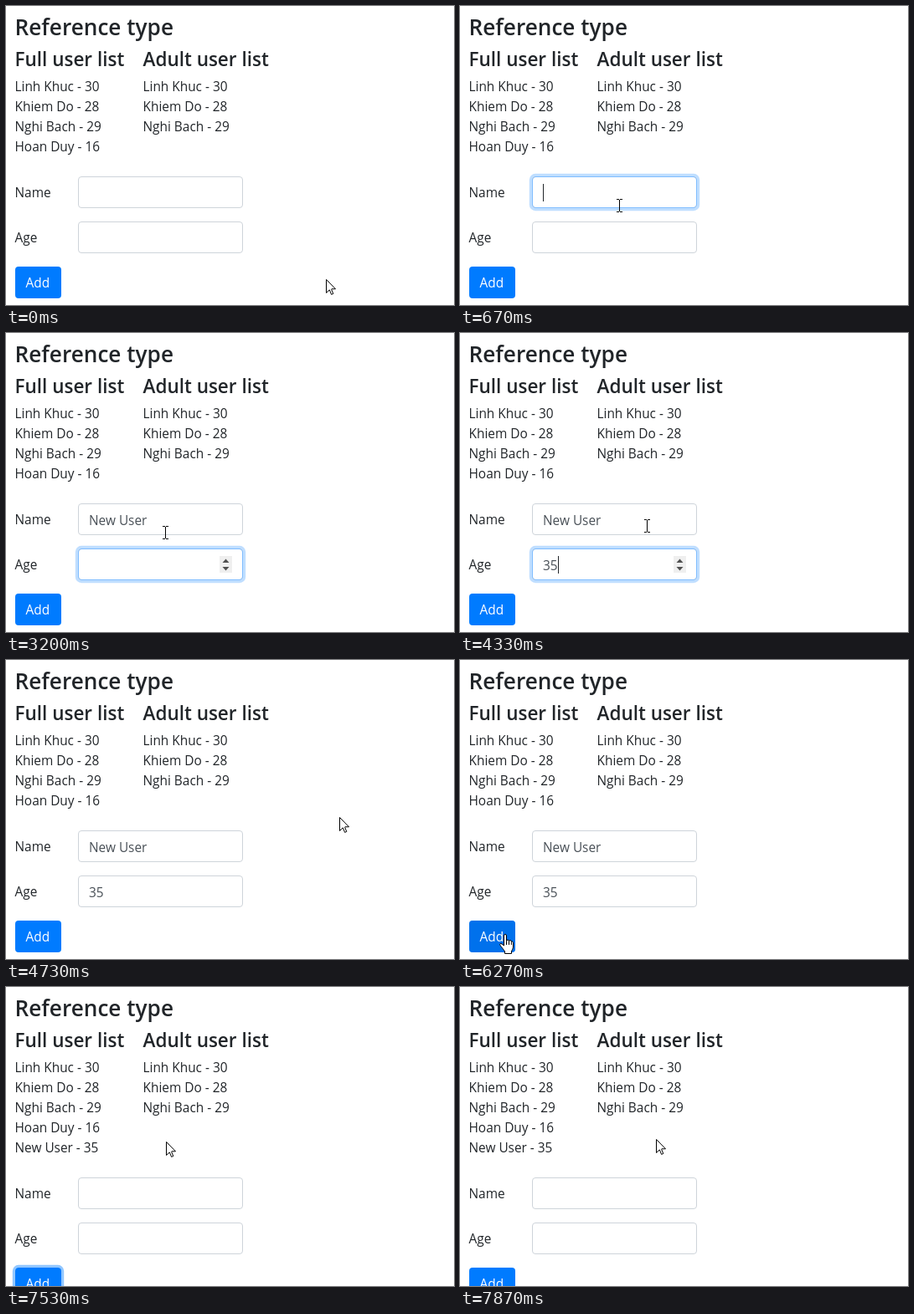
These frames come from a looping animation (535x358 px, 8000 ms). An HTML page:

```html
<!DOCTYPE html>
<html lang="en">
<head>
<meta charset="utf-8">
<title>Reference type</title>
<style>
html, body { margin: 0; width: 100%; height: 100%; overflow: hidden; background: #fff; }
svg { display: block; width: 100%; height: 100%; }
text { font: 15.4px "Open Sans", "Noto Sans", sans-serif; fill: #212529; white-space: pre; }
.h3 { font-size: 26.2px; font-weight: 600; }
.h4 { font-size: 22.5px; font-weight: 600; }
.value { fill: #495057; }
</style>
</head>
<body>
<svg id="stage" viewBox="0 0 535 358"></svg>
<script>
const NS = 'http://www.w3.org/2000/svg';
const LOOP = 8000, RATE = 15 / 1000;
const LEFT = 10.5, RIGHT = 163.5;
const stage = document.getElementById('stage');

function add(parent, tag, attrs, content) {
  const el = document.createElementNS(NS, tag);
  for (const key in attrs) el.setAttribute(key, attrs[key]);
  if (content) el.textContent = content;
  return parent.appendChild(el);
}
const label = (parent, x, y, content, cls = '') => add(parent, 'text', { x, y, class: cls }, content);
const show = (el, on) => el.setAttribute('visibility', on ? 'visible' : 'hidden');
const fade = (el, value) => el.setAttribute('opacity', value);

// Value of a keyframe list [[tick, ...values]] at a tick
function track(keys, tick, ease = u => u) {
  let i = 0;
  while (i < keys.length - 1 && keys[i + 1][0] <= tick) i++;
  const a = keys[i], b = keys[i + 1];
  if (tick <= a[0] || !b) return a.slice(1);
  const u = ease((tick - a[0]) / (b[0] - a[0]));
  return a.slice(1).map((v, j) => v + (b[j + 1] - v) * u);
}
const smooth = u => u * u * (3 - 2 * u);

// Latest entry of [[tick, value]] that has started
const latest = (list, tick) => list.reduce((v, [at, next]) => tick >= at ? next : v, '');
const within = (spans, tick) => spans.some(([a, b]) => tick >= a && tick < b);

const users = ['Linh Khuc - 30', 'Khiem Do - 28', 'Nghi Bach - 29', 'Hoan Duy - 16'];
label(stage, LEFT, 35, 'Reference type', 'h3');
label(stage, LEFT, 72, 'Full user list', 'h4');
label(stage, RIGHT, 72, 'Adult user list', 'h4');
users.forEach((user, i) => {
  label(stage, LEFT, 102 + 24 * i, user);
  if (i < 3) label(stage, RIGHT, 102 + 24 * i, user);
});
const newUser = label(stage, LEFT, 198, 'New User - 35');

const form = add(stage, 'g');

function ring(x, y, w, h, color) {
  return add(form, 'rect', {
    x: x - 1.6, y: y - 1.6, width: w + 3.2, height: h + 3.2, rx: 5.6,
    fill: 'none', stroke: color, 'stroke-width': 3.2
  });
}
function field(name, y) {
  label(form, LEFT, y + 25, name);
  const border = stroke => add(form, 'rect', {
    x: 86.5, y: y + .5, width: 196, height: 37, rx: 3.5, fill: 'none', stroke
  });
  border('#ced4da');
  return {
    glow: [ring(86, y, 197, 38, 'rgba(0,123,255,.25)'), border('#80bdff')],
    value: label(form, 99, y + 26, '', 'value'),
    caret: add(form, 'rect', { y: y + 9, width: 1, height: 21, fill: '#212529' })
  };
}
const nameField = field('Name', 204);
const ageField = field('Age', 258);

const spinner = add(form, 'g');
add(spinner, 'rect', { x: 255, y: 267, width: 15, height: 20, fill: '#efefef' });
add(spinner, 'path', { d: 'M258.5 275h8l-4-4.5zM258.5 280h8l-4 4.5z', fill: '#505050' });

const buttonRing = ring(11, 312, 55, 38, 'rgba(38,143,255,.5)');
const buttonFace = fill => add(form, 'rect', { x: 11, y: 312, width: 55, height: 38, rx: 4, fill });
buttonFace('#007bff');
const hoverFace = buttonFace('#0069d9');
const activeFace = buttonFace('#0062cc');
label(form, 23.5, 337, 'Add').style.fill = '#fff';

const outline = { fill: '#fff', stroke: '#000', 'stroke-linejoin': 'round' };
const pointer = add(stage, 'g');
const shapes = {
  arrow: add(pointer, 'path', {
    ...outline,
    d: 'M.5.5V16.5L4.3 12.9 6.6 18.4 8.8 17.5 6.7 12.5 6.9 11.8H11.5Z'
  }),
  beam: add(pointer, 'path', {
    fill: '#000',
    d: 'M-3-8h3v1h-3zM1-8h3v1h-3zM0-7h1v14h-1zM-3 7h3v1h-3zM1 7h3v1h-3z'
  }),
  hand: add(pointer, 'path', {
    ...outline,
    d: 'M-1.5 13V1a1.5 1.5 0 0 1 3 0V7.5a1.4 1.4 0 0 1 3 .3 1.4 1.4 0 0 1 2.8.5' +
       ' 1.4 1.4 0 0 1 2.2 1V14c0 3-1.5 4-2 6v2.5H-.5V20C-1.5 18-4.5 15-6 12.5' +
       'c-1-1.5.5-2.8 2-1.5ZM1.5 7.5v4.5M4.5 8v4M7.3 8.5v3.5'
  })
};

const ADDED = 101;
const path = [
  [0, 382, 327], [7, 195, 239], [9, 195, 239], [10, 190, 239],
  [64, 190, 239], [68, 398, 188], [88, 398, 188], [94, 54, 329],
  [101, 54, 329], [106, 68, 195], [109, 68, 195], [115, 234, 182]
];
const nameText = [[21, 'N'], [23, 'New'], [25, 'New '], [32, 'New U'], [34, 'New Use'], [35, 'New User'], [ADDED, '']];
const ageText = [[61, '3'], [65, '35'], [ADDED, '']];
const nameGlow = [[5, 0], [8, 1], [39, 1], [42, 0]];
const ageGlow = [[39, 0], [42, 1], [69, 1], [71, 0]];
const buttonGlow = [[99, 0], [102, 1], [115, 1], [118, 0]];
const hover = [[93, 0], [95, 1], [100, 1], [103, 0]];
const nameCaret = [[6, 15], [21, 40]];
const ageCaret = [[40, 48], [56, 70]];

function drawField(f, text, glow, caret, tick) {
  f.value.textContent = latest(text, tick);
  const [g] = track(glow, tick);
  f.glow.forEach(el => fade(el, g));
  show(f.caret, within(caret, tick));
  const width = f.value.textContent ? f.value.getComputedTextLength() : 0;
  f.caret.setAttribute('x', Math.round(99 + width));
}

function draw(time) {
  const tick = Math.floor((time % LOOP + 4) * RATE);
  const added = tick >= ADDED;
  const shift = added ? 24 : 0;
  show(newUser, added);
  form.setAttribute('transform', `translate(0 ${shift})`);

  drawField(nameField, nameText, nameGlow, nameCaret, tick);
  drawField(ageField, ageText, ageGlow, ageCaret, tick);
  fade(buttonRing, track(buttonGlow, tick)[0]);
  fade(hoverFace, track(hover, tick)[0]);
  show(activeFace, tick === 100);

  const [x, y] = track(path, tick, smooth).map(Math.round);
  const over = (l, t, r, b) => x >= l && x < r && y >= t && y < b;
  const overField = top => over(86, top + shift, 283, top + shift + 38);
  const overButton = over(11, 312 + shift, 66, 350 + shift);
  const overText = added && over(11, 181, 111, 205);
  const kind = overButton ? 'hand' : overField(204) || overField(258) || overText ? 'beam' : 'arrow';
  for (const name in shapes) shapes[name].setAttribute('display', name === kind ? 'inline' : 'none');
  pointer.setAttribute('transform', `translate(${x} ${y})`);
  show(spinner, within([[40, 70]], tick) || overField(258));
}

const start = performance.now();
function loop() {
  draw(performance.now() - start);
  requestAnimationFrame(loop);
}
loop();
</script>
</body>
</html>
```
